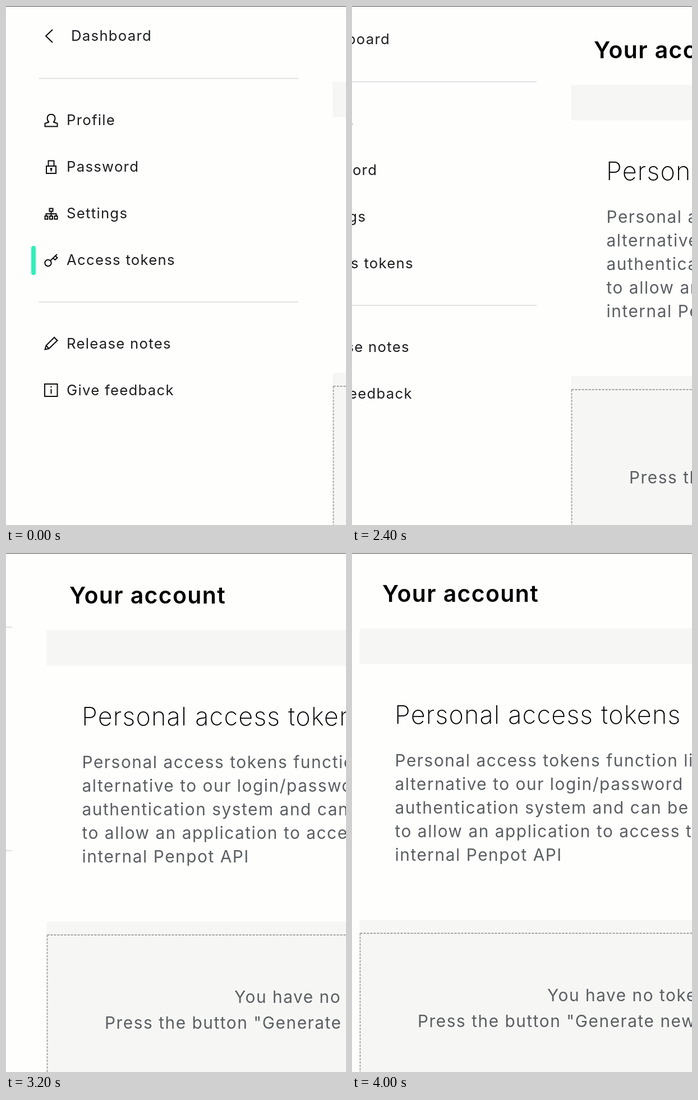
Write an HTML page that moves like this. It is 606 px wide and 924 px high and loops after 6.7 s.

```html
<!DOCTYPE html>
<html lang="en">
<head>
<meta charset="utf-8">
<title>Account settings pan</title>
<style>
  html, body { margin: 0; width: 100%; height: 100%; overflow: hidden; background: #fefefd; }
  #stage { position: relative; width: 606px; height: 924px; overflow: hidden; }
  #page { position: absolute; left: 0; top: 0; display: block; }
  #edge { position: absolute; left: 0; top: 0; width: 100%; height: 1px; background: #4c4c4c; }
  text { font-family: Inter, "Open Sans", sans-serif; }
  .menu { font-size: 25.7px; fill: #1d1e1f; letter-spacing: .05em; }
  .title { font-size: 41px; font-weight: 600; letter-spacing: .033em; }
  .head { font-size: 45px; font-weight: 250; letter-spacing: .027em; }
  .body { font-size: 29.8px; fill: #5b5f62; letter-spacing: .052em; }
  .icon { fill: none; stroke: #0b0b0b; stroke-width: 2; }
  .rule { stroke: #e1e1e1; stroke-width: 2; }
  .panel { fill: #f6f6f5; }
  .dash { fill: none; stroke: #a3a3a3; stroke-width: 1.8; stroke-dasharray: 4 2; }
</style>
</head>
<body>
<div id="stage">
  <svg id="page" width="1500" height="1000" viewBox="0 0 1500 1000">
    <path class="rule" d="M58.5 129H521M58.5 527H521"/>
    <rect x="45" y="427" width="8" height="52" rx="4" fill="#31efb8"/>
    <g class="icon">
      <path d="M83 42L71 53.5L83 65"/>
      <!-- person -->
      <path d="M76.5 207C72 202 72.5 193 80.5 193S89 202 84.5 207M77 206.5L69.5 209V214.5H91.5V209L84 206.5"/>
      <!-- padlock -->
      <path d="M72 285h17v13h-17zM75.5 285v-9.5h10v9.5M80.5 290v4.5"/>
      <circle cx="80.5" cy="290" r="1"/>
      <!-- tree -->
      <path d="M77.5 360.5h6v5h-6zM80.5 366v8M71.5 374v-4h18v4"/>
      <path d="M69.5 374h5v5.5h-5zm8.5 0h5v5.5h-5zm8.5 0h5v5.5h-5z"/>
      <!-- key -->
      <circle cx="75" cy="457.5" r="5.7"/>
      <path d="M79.5 453L91 442M84 449l3.5 3 4-4-3.5-3"/>
      <!-- pencil -->
      <path d="M69.5 611.5l2-7L86 590l5.5 5.5-15 14.5zM71.5 604.5l5 5.5"/>
      <!-- info -->
      <path d="M69 673h22.5v22h-22.5zM80.5 677v2.5m0 2.5v8.5"/>
    </g>
    <rect class="panel" x="582.5" y="134.5" width="900" height="63"/>
    <rect class="panel" x="582.5" y="653" width="900" height="340"/>
    <path class="dash" d="M583.5 677H1480M583.5 677V990"/>
  </svg>
  <div id="edge"></div>
</div>
<script>
  const page = document.getElementById("page");

  function write(style, x, y, lines, pitch = 0) {
    lines.forEach((line, i) => {
      const el = document.createElementNS(page.namespaceURI, "text");
      el.setAttribute("class", style);
      el.setAttribute("x", x);
      el.setAttribute("y", y + i * pitch);
      el.textContent = line;
      page.append(el);
    });
  }

  write("menu", 116, 62, ["Dashboard"]);
  write("menu", 108, 212, ["Profile", "Password", "Settings", "Access tokens"], 83);
  write("menu", 108, 609.5, ["Release notes", "Give feedback"], 83);
  write("title", 623, 87, ["Your account"]);
  write("head", 645, 304, ["Personal access tokens"]);
  write("body", 645.5, 379.5, [
    "Personal access tokens function like an",
    "alternative to our login/password",
    "authentication system and can be used",
    "to allow an application to access the",
    "internal Penpot API"
  ], 42);
  write("body", 917, 798, ["You have no tokens so far."]);
  write("body", 686, 844, ['Press the button "Generate new token" to generate one.']);

  // Key poses of the pan: time, x, y, and the number of jumps to the next pose.
  const LOOP = 6700;
  const pan = [
    [0, 0, 0, 1],
    [1600, -1, 0, 2],
    [1800, -22, 1, 4],
    [2200, -133, 5, 1],
    [2400, -192, 6, 4],
    [2800, -343, 10, 4],
    [3200, -510, 3, 1],
    [3400, -525, 3, 1],
    [3700, -541, 2, 3],
    [4000, -569, 0, 1],
    [LOOP, -569, 0, 1]
  ];
  page.animate(
    pan.map(([t, x, y, jumps]) => ({
      offset: t / LOOP,
      transform: `translate(${x}px, ${y}px)`,
      easing: `steps(${jumps}, end)`
    })),
    { duration: LOOP, iterations: Infinity }
  );
</script>
</body>
</html>
```
